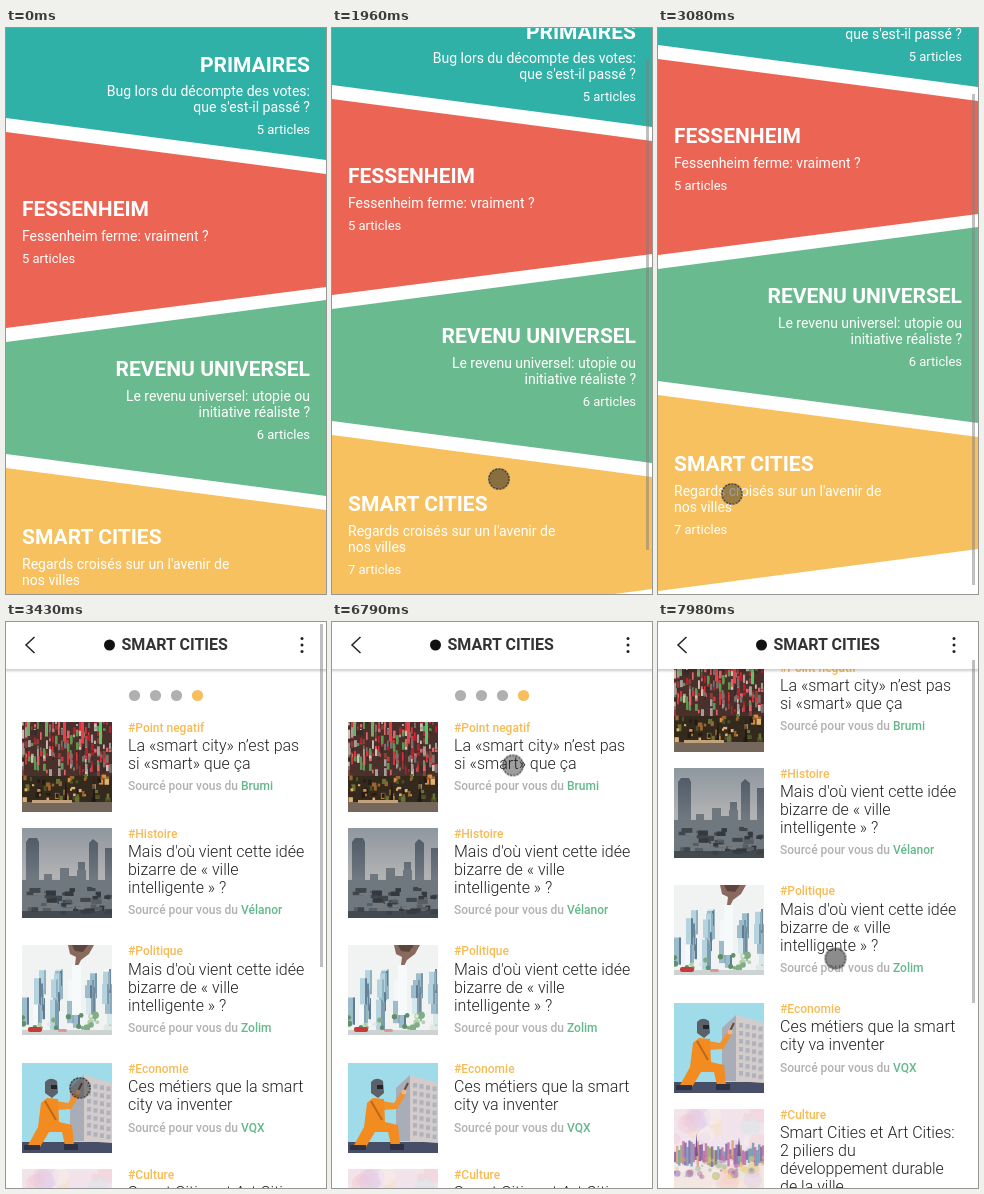
Animation of 320x566 px, one loop 8000 ms. Source, as an HTML page:

```html
<!DOCTYPE html>
<html lang="fr">
<head>
<meta charset="utf-8">
<title>Smart cities</title>
<style>
html, body { margin: 0; width: 100%; height: 100%; overflow: hidden; background: #fff; }
svg { display: block; width: 320px; height: 566px; font-family: Roboto, sans-serif; }
.name { font-size: 21px; font-weight: 700; }
.lead { font-size: 14px; }
.count { font-size: 13px; }
.tag { font-size: 12px; font-weight: 500; fill: #f7bb55; }
.head { font-size: 16px; font-weight: 300; fill: #222; }
.from { font-size: 12px; font-weight: 500; fill: #b0b0b0; }
.from tspan { fill: #62b98b; }
.thumb { fill: #808080; fill-opacity: .5; }

#topics, #topicThumb, #topicBar, #reader, #feed, #feedThumb, #feedBar, #touch, #disc {
  animation: 8s linear infinite;
}
#topics { animation-name: topics; }
#topicThumb { animation-name: topicThumb; }
#topicBar { animation-name: topicBar; }
#reader { animation-name: reader; animation-timing-function: step-end; }
#feed { animation-name: feed; }
#feedThumb { animation-name: feedThumb; }
#feedBar { animation-name: feedBar; }
#touch { animation-name: touch, appear; animation-timing-function: linear, step-end; }
#disc { animation-name: press; animation-timing-function: step-end; }

@keyframes topics {
  0%, 22.28% { transform: translateY(0); }
  24.5% { transform: translateY(-33px); }
  28%, 100% { transform: translateY(-73px); }
}
@keyframes topicThumb {
  0%, 22.28% { transform: translateY(0); }
  24.5% { transform: translateY(29px); }
  28%, 100% { transform: translateY(64px); }
}
@keyframes topicBar {
  0% { opacity: 0; animation-timing-function: step-end; }
  21.875%, 38.5% { opacity: 1; }
  42%, 100% { opacity: 0; }
}
@keyframes reader {
  0% { opacity: 0; }
  42.875%, 100% { opacity: 1; }
}
@keyframes feed {
  0%, 94.5% { transform: translateY(0); }
  95.375% { transform: translateY(-3px); }
  99.75%, 100% { transform: translateY(-60px); }
}
@keyframes feedThumb {
  0%, 94.5% { transform: translateY(0); }
  95.375% { transform: translateY(1px); }
  99.75%, 100% { transform: translateY(36px); }
}
@keyframes feedBar {
  0%, 48.125% { opacity: 1; }
  52.5% { opacity: 0; animation-timing-function: step-end; }
  95.375%, 100% { opacity: 1; }
}
@keyframes touch {
  0%, 7.875% { transform: translate(269px, 309px); animation-timing-function: ease-in-out; }
  17.5% { transform: translate(175px, 482px); }
  20.125%, 21% { transform: translate(171px, 503px); }
  24.5% { transform: translate(167px, 451px); }
  28%, 31.5% { transform: translate(165px, 406px); animation-timing-function: ease-in-out; }
  38.5%, 48.125% { transform: translate(74px, 466px); }
  52.5%, 56% { transform: translate(75px, 466px); animation-timing-function: cubic-bezier(.42, 0, .75, .9); }
  64.75% { transform: translate(177.5px, 176.5px); }
  66.5% { transform: translate(179px, 156px); }
  68.25%, 69.125% { transform: translate(180px, 149px); }
  72.625%, 84% { transform: translate(181px, 138px); animation-timing-function: ease-in-out; }
  92.75%, 94.5% { transform: translate(177.5px, 412px); }
  95.375% { transform: translate(178.5px, 396.5px); }
  99.75%, 100% { transform: translate(177.5px, 336.5px); }
}
@keyframes appear {
  0% { opacity: 0; }
  7.875%, 100% { opacity: 1; }
}
@keyframes press {
  0% { fill-opacity: .44; }
  20.125% { fill-opacity: .52; }
  28.875% { fill-opacity: .44; }
  94.5%, 100% { fill-opacity: .52; }
}
</style>
</head>
<body>
<svg viewBox="0 0 320 566" xmlns="http://www.w3.org/2000/svg">
  <defs>
    <clipPath id="square"><rect width="90" height="90"/></clipPath>
    <linearGradient id="haze" x2="0" y2="1">
      <stop stop-color="#8f979f"/><stop offset=".55" stop-color="#b3b3b3"/><stop offset="1" stop-color="#70767c"/>
    </linearGradient>
    <linearGradient id="tower" x2="0" y2="1">
      <stop stop-color="#515c68"/><stop offset="1" stop-color="#7c838a"/>
    </linearGradient>
    <linearGradient id="wash" x2="0" y2="1">
      <stop stop-color="#f3e3ea"/><stop offset=".5" stop-color="#efe4ee"/><stop offset="1" stop-color="#f6e8d8"/>
    </linearGradient>
    <linearGradient id="shade" x2="0" y2="1">
      <stop stop-color="#000" stop-opacity=".2"/><stop offset="1" stop-color="#000" stop-opacity="0"/>
    </linearGradient>
  </defs>

  <g id="topics"></g>
  <g id="topicBar"><rect id="topicThumb" class="thumb" x="314" y="2" width="3" height="491"/></g>

  <g id="reader">
    <rect width="320" height="566" fill="#fff"/>
    <g id="feed"></g>
    <rect y="47" width="320" height="4" fill="url(#shade)"/>
    <rect width="320" height="47" fill="#fff"/>
    <path d="M28.5 15L20 23l8.5 8" fill="none" stroke="#222" stroke-width="1.5"/>
    <circle cx="103.5" cy="23" r="5.5" fill="#111"/>
    <text x="115.5" y="28" font-size="16" font-weight="700" fill="#333">SMART CITIES</text>
    <g fill="#222">
      <circle cx="296" cy="16.5" r="1.5"/><circle cx="296" cy="23" r="1.5"/><circle cx="296" cy="29.5" r="1.5"/>
    </g>
    <g id="feedBar"><rect id="feedThumb" class="thumb" x="314" y="2" width="3" height="343"/></g>
  </g>

  <g id="touch">
    <circle id="disc" r="11" fill="#222"/>
    <circle r="10.5" fill="none" stroke="#fff" stroke-opacity=".3"/>
    <circle r="10" fill="none" stroke="#222" stroke-opacity=".8" stroke-width="1.2" stroke-dasharray="2 1.3"/>
  </g>
</svg>

<script>
const byId = id => document.getElementById(id);
const rect = (x, y, w, h, fill, more = '') =>
  `<rect x="${x}" y="${y}" width="${w}" height="${h}" fill="${fill}" ${more}/>`;
const path = (d, fill, more = '') => `<path d="${d}" fill="${fill}" ${more}/>`;
const dot = (x, y, r, fill, more = '') => `<circle cx="${x}" cy="${y}" r="${r}" fill="${fill}" ${more}/>`;
const text = (cls, x, y, s) => `<text class="${cls}" x="${x}" y="${Math.round(y)}">${s}</text>`;
const times = (n, fn) => Array.from({ length: n }, (_, i) => fn(i)).join('');

let seed = 7;
const rnd = (a, b) => {
  seed = (seed * 16807) % 2147483647;
  return Math.round((a + (b - a) * seed / 2147483647) * 10) / 10;
};
const pick = list => list[Math.floor(rnd(0, list.length - .1))];

// Topic list
const topics = [
  { name: 'PRIMAIRES', y: 43.5, right: true, count: 5, color: '#2fb1a7',
    shape: 'M0-10H320V132L0 90Z', lead: ['Bug lors du décompte des votes:', "que s'est-il passé ?"] },
  { name: 'FESSENHEIM', y: 188, count: 5, color: '#ec6453',
    shape: 'M0 104L320 146V259L0 300Z', lead: ['Fessenheim ferme: vraiment ?'] },
  { name: 'REVENU UNIVERSEL', y: 348, right: true, count: 6, color: '#69ba8e',
    shape: 'M0 314L320 272V468L0 426Z', lead: ['Le revenu universel: utopie ou', 'initiative réaliste ?'] },
  { name: 'SMART CITIES', y: 516, count: 7, color: '#f8c15f',
    shape: 'M0 440L320 482V594L0 636Z', lead: ["Regards croisés sur un l'avenir de", 'nos villes'] }
];

byId('topics').innerHTML = topics.map(({ name, y, right, count, color, shape, lead }) => {
  const x = right ? 304 : 16;
  return path(shape, color) + `<g fill="#fff" text-anchor="${right ? 'end' : 'start'}">` +
    text('name', x, y, name) +
    lead.map((s, i) => text('lead', x, y + 24.9 + i * 16, s)).join('') +
    text('count', x, y + 30.8 + lead.length * 16, count + ' articles') + '</g>';
}).join('');

// Thumbnails, each 90 by 90
const lights = () => rect(0, 0, 90, 90, '#4a302a') +
  times(230, () => rect(Math.floor(rnd(0, 30)) * 3, rnd(-4, 48), rnd(1.5, 3), rnd(3, 9),
    pick(['#d8323c', '#b3202e', '#e0656a', '#8d4038', '#5d9a50', '#cdbfb2', '#7d6f6c', '#a89c98', '#3c2a28']))) +
  times(5, i => rect(5 + i * 18, 0, 3, rnd(12, 30), pick(['#54c96a', '#e8404a', '#6fae66']))) +
  rect(0, 54, 90, 36, '#33291d') +
  times(60, () => rect(rnd(0, 86), rnd(52, 76), rnd(2, 5), rnd(2, 6),
    pick(['#d98c3c', '#9a6531', '#6b7034', '#4b5128', '#241b18', '#e0b070']))) +
  path('M41 90L44 58l2 32ZM70 90l2-36 2 36Z', '#1d1815') +
  rect(0, 80, 90, 10, '#75675c') + rect(10, 78, 40, 3, '#c2a27d');

const towers = () => rect(0, 0, 90, 90, 'url(#haze)') +
  path('M4 66V14l3-4h8l2 4v52ZM56 66V34h7v32ZM67 66V15l4-4 5 4v51ZM83 66V20h7v46Z', 'url(#tower)') +
  path('M0 52h22v-6h8v6h8V40h9v8h8V42h9v10h26v38H0Z', '#6f777f') +
  times(50, () => rect(rnd(-4, 86), rnd(58, 84), rnd(4, 11), rnd(2, 6), pick(['#3f464c', '#565d64', '#767a7d', '#33393e']))) +
  rect(0, 83, 90, 7, '#3a4045', 'opacity=".8"');

const model = () => rect(0, 0, 90, 90, '#f1f3f3') +
  times(34, i => {
    const x = (i * 17) % 86, top = rnd(24, 62), h = rnd(12, 32);
    return rect(x, top, 7, h, pick(['#d5e8ee', '#b4d3de', '#f4f8fa', '#9dbccb'])) +
      rect(x + 5, top, 2, h, pick(['#6d8ea3', '#88a9b9', '#4f6f88']), 'opacity=".8"');
  }) +
  path('M46 0H72L67 9 59 15 56 21 53 20 54 12 48 9Z', '#8a6a5e') + path('M50 0H66L61 7 53 6Z', '#5d453e') +
  rect(50, 20, 9, 50, '#f7fafb') +
  times(24, () => dot(rnd(0, 90), rnd(70, 84), rnd(1.5, 4), pick(['#7fae84', '#b4cfaa', '#5f9068', '#e3e8e4']))) +
  rect(0, 85, 90, 5, '#cdd3d3') + rect(6, 82, 14, 5, '#c83a3a', 'rx="2"') + rect(36, 84, 9, 3, '#d89a94', 'rx="1.5"');

const welder = () => rect(0, 0, 90, 90, '#a0dbea') + rect(0, 79, 90, 11, '#474f68') +
  path('M48 25L62 12V78H48Z', '#a9adb8') + path('M62 12L90 20V80L62 78Z', '#d3ccca') +
  times(28, i => rect(65 + (i % 4) * 6.5, 20 + Math.floor(i / 4) * 8 + (i % 4) * 1.2, 4, 4.5, '#aeb2bd')) +
  path('M34 38L46 40 54 28 58 31 49 46 35 47Z', '#f0922e') +
  path('M19 40L25 35 36 36 37 59 50 62 52 82H43L40 69 27 69 18 84H5L16 64Z', '#f28c20') +
  path('M2 82H18V87H2ZM42 81H56V87H42Z', '#2f3142') + path('M23 38L34 57', 'none', 'stroke="#bd671b" stroke-width="2"') +
  path('M23 19Q28 13 35 18L36 30 30 35 23 30Z', '#5c6068') + rect(29, 22, 6, 4, '#22252c') +
  path('M55 30L60 20', 'none', 'stroke="#6b4a34" stroke-width="2"') + dot(56, 29, 2.5, '#e9b98c');

const paint = () => rect(0, 0, 90, 90, 'url(#wash)') +
  times(30, () => dot(rnd(0, 90), rnd(0, 86), rnd(4, 12), pick(['#f4c9d2', '#dfcbe8', '#f8e0b4', '#d3e6e4', '#fbf3ea']), 'opacity=".4"')) +
  times(44, i => {
    const h = rnd(3, 15);
    return rect(i * 2.05, 46 - h, 2.4, h + rnd(4, 12), pick(['#7a4f9c', '#b8609c', '#dc9a65', '#5b93aa', '#76518f', '#8fa05a']), 'opacity=".75"');
  }) +
  path('M21 47L22.5 24 24 47ZM63 47L65 28 67 47Z', '#77548e') +
  times(50, () => dot(rnd(0, 90), rnd(46, 68), rnd(1, 4), pick(['#e2a659', '#b86fa8', '#8eb88d', '#efcf72', '#8a62ab']), 'opacity=".5"'));

// Article feed
const articles = [
  { y: 100, tag: 'Point negatif', by: 'Brumi', art: lights, head: ['La «smart city» n’est pas', 'si «smart» que ça'] },
  { y: 206, tag: 'Histoire', by: 'Vélanor', art: towers, head: ["Mais d'où vient cette idée", 'bizarre de « ville', 'intelligente » ?'] },
  { y: 323.5, tag: 'Politique', by: 'Zolim', art: model, head: ["Mais d'où vient cette idée", 'bizarre de « ville', 'intelligente » ?'] },
  { y: 441.4, tag: 'Economie', by: 'VQX', art: welder, head: ['Ces métiers que la smart', 'city va inventer'] },
  { y: 547, tag: 'Culture', by: 'Brumi', art: paint,
    head: ['Smart Cities et Art Cities:', '2 piliers du', 'développement durable', 'de la ville'] }
];

byId('feed').innerHTML =
  times(4, i => dot(128.5 + i * 21, 73.5, 5.6, i < 3 ? '#b0b0b0' : '#f7be5a')) +
  articles.map(({ y, tag, by, art, head }) =>
    `<g transform="translate(16 ${Math.floor(y)})" clip-path="url(#square)">${art()}</g>` +
    text('tag', 122, y + 9.9, '#' + tag) +
    head.map((s, i) => text('head', 122, y + 29 + i * 18, s)).join('') +
    text('from', 122, y + 32.1 + head.length * 18, `Sourcé pour vous du <tspan>${by}</tspan>`)
  ).join('');

// Sample the keyframes every 70 ms, like a screen recording
const LOOP = 8000, TICK = 70;
const anims = document.getAnimations();
anims.forEach(a => a.pause());
const start = performance.now();
function play() {
  const t = (performance.now() - start) % LOOP;
  const at = Math.floor(t / TICK) * TICK;
  anims.forEach(a => { a.currentTime = at + .01; });
  requestAnimationFrame(play);
}
play();
</script>
</body>
</html>
```
